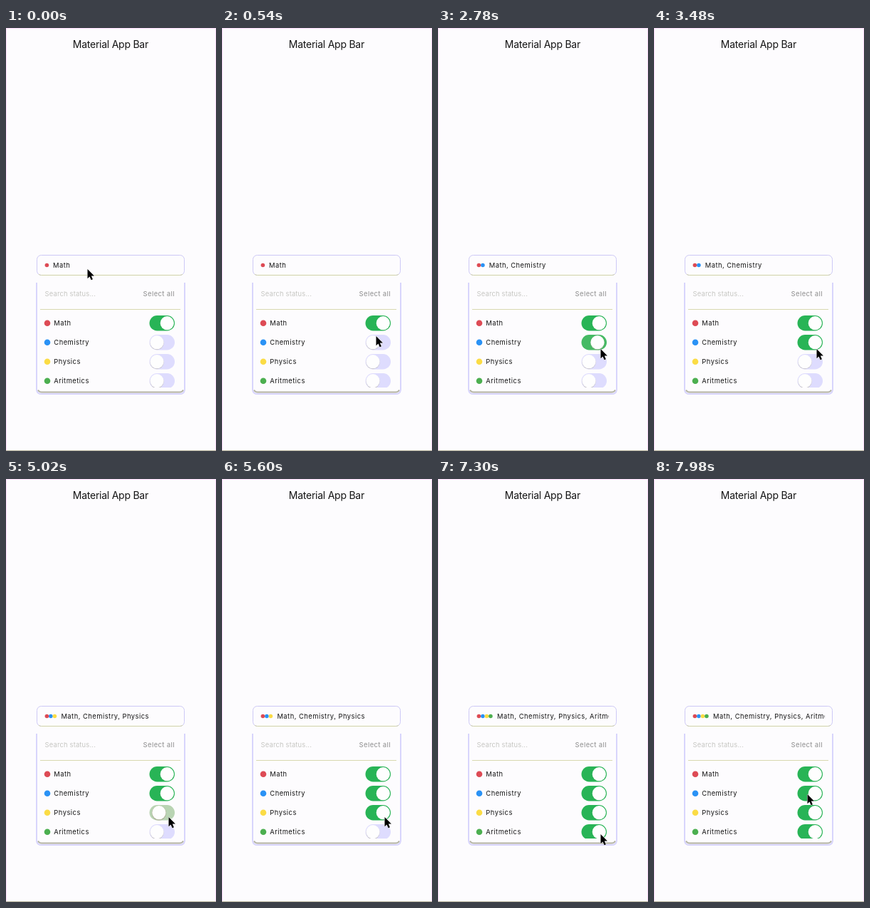
An HTML page that plays this animation: 295 px wide and 593 px high, repeating every 8000 ms.

```html
<!DOCTYPE html>
<html lang="en">
<head>
<meta charset="utf-8">
<title>Multi-select dropdown</title>
<style>
  html, body { margin: 0; width: 100%; height: 100%; overflow: hidden; background: #fdfcfe; }
  svg { display: block; width: 295px; height: 593px; }
  text { font: 400 9.4px Inter, sans-serif; letter-spacing: .48px; fill: #151515; white-space: pre; }
  .title { font-size: 14px; letter-spacing: -.25px; }
  .hint { letter-spacing: .18px; fill: #c6c6c2; }
  .all { font-weight: 500; letter-spacing: .37px; fill: #9b9b9b; }
</style>
</head>
<body>
<svg viewBox="0 0 295 593">
  <defs>
    <clipPath id="fieldClip"><rect x="50" y="320" width="190" height="25"/></clipPath>
    <clipPath id="listClip"><rect x="44" y="396" width="207" height="108"/></clipPath>
  </defs>
  <rect width="295" height="593" fill="#fdfcfe"/>
  <path d="M.5 592V.5H294.5V592" fill="none" stroke="#fbdcfb"/>
  <path d="M0 592.5H295" stroke="#b5b09a"/>
  <text class="title" x="93.8" y="28">Material App Bar</text>

  <rect x="43.5" y="318.5" width="207" height="28" rx="6" fill="#fdfcfe" stroke="#cdc9f6"/>
  <path d="M46 345.2Q47.5 346.5 49.5 346.5H244.5Q246.5 346.5 248 345.2" fill="none" stroke="#d0d2a8"/>
  <g id="field" clip-path="url(#fieldClip)"></g>

  <path d="M43 357V506Q43 513 50 513H244Q251 513 251 506V357" fill="none" stroke="#d8d5fc" stroke-width="2"/>
  <path d="M44 353V504Q44 511 50 511H244Q250 511 250 504V353Z" fill="#fdfcfe"/>
  <path d="M45 507.5Q46.5 510.5 50 510.5H244Q247.5 510.5 249 507.5" fill="none" stroke="#b3b3a4" stroke-width="1.8"/>
  <text class="hint" x="54.5" y="376">Search status...</text>
  <text class="all" x="192.6" y="376">Select all</text>
  <path d="M48 394.5H245" stroke="#d8d9b0"/>
  <g id="list" clip-path="url(#listClip)"></g>

  <path id="cursor" d="M.5 1V14.2L3.5 11.4 5.6 16.2 7.9 15.2 5.8 10.6H9.9Z"
        fill="#000" stroke="#fff" stroke-width="1" paint-order="stroke" stroke-linejoin="round"/>
</svg>
<script>
const LOOP = 8000, SLIDE = 350;

// on: moment the switch is pressed
const items = [
  { name: 'Math', color: '#dd4b55', on: -SLIDE },
  { name: 'Chemistry', color: '#2a92f5', on: 2520 },
  { name: 'Physics', color: '#fbdc45', on: 4920 },
  { name: 'Aritmetics', color: '#4caf50', on: 6560 }
];

// time, x, y of the pointer tip
const path = [
  [20, 114, 337], [540, 216, 431], [820, 220, 438], [960, 222, 440],
  [1380, 222, 440], [1560, 230, 446], [1940, 230, 446], [2100, 228, 449],
  [3560, 228, 449], [4080, 228, 469], [4180, 228, 469], [4360, 228, 473],
  [5740, 228, 473], [6460, 228, 497], [7400, 228, 497], [7960, 215, 441]
];

const $ = id => document.getElementById(id);
const clamp = v => Math.min(1, Math.max(0, v));
const ease = v => v * v * (3 - 2 * v);
const mix = (a, b, k) => a + (b - a) * k;

function set(el, attrs) {
  for (const key in attrs) el.setAttribute(key, attrs[key]);
}

function add(parent, tag, attrs, text) {
  const el = document.createElementNS('http://www.w3.org/2000/svg', tag);
  set(el, attrs);
  if (text) el.textContent = text;
  return parent.appendChild(el);
}

const label = add($('field'), 'text', { y: 335.7 });
items.forEach((item, i) => {
  const y = 413.7 + 27 * i, list = $('list');
  item.dot = add($('field'), 'circle', { cx: 57.4 + 5.5 * i, cy: 332.5, r: 2.8, fill: item.color });
  add(list, 'circle', { cx: 58, cy: y, r: 4.3, fill: item.color });
  add(list, 'text', { x: 67.3, y: y + 3.4 }, item.name);
  item.track = add(list, 'rect', { x: 201.5, y: y - 10.7, width: 35.5, height: 21.4, rx: 10.7 });
  item.shade = add(list, 'circle', { cy: y + .8, fill: '#a8a48c' });
  item.thumb = add(list, 'circle', { cy: y, r: 9.6, fill: '#fefefe' });
});

function pointerAt(t) {
  const next = path.findIndex(p => p[0] > t);
  if (next === 0) return path[0].slice(1);
  if (next < 0) return path[path.length - 1].slice(1);
  const a = path[next - 1], b = path[next];
  const k = ease((t - a[0]) / (b[0] - a[0]));
  return [mix(a[1], b[1], k), mix(a[2], b[2], k)];
}

// Lavender to green; blue fades first
function trackColor(k) {
  return `rgb(${mix(222, 40, k)}, ${mix(220, 180, k)}, ${mix(254, 86, Math.sqrt(k))})`;
}

function draw(t) {
  const chosen = items.filter(item => t >= item.on);
  const names = chosen.map(item => item.name).join(', ');
  if (label.textContent !== names) label.textContent = names;
  set(label, { x: 66 + 5.7 * (chosen.length - 1) });

  for (const item of items) {
    const k = ease(clamp((t - item.on) / SLIDE));
    const cx = mix(212, 226.3, k);
    const moving = 4 * k * (1 - k);
    set(item.dot, { visibility: t >= item.on ? 'visible' : 'hidden' });
    set(item.track, { fill: trackColor(k) });
    set(item.thumb, { cx });
    set(item.shade, { cx, r: 9.7 + .8 * moving, opacity: mix(.5, .1, k) + .4 * moving });
  }
  set($('cursor'), { transform: `translate(${pointerAt(t)})` });
}

const start = performance.now();
function tick() {
  draw((performance.now() - start) % LOOP);
  requestAnimationFrame(tick);
}
tick();
</script>
</body>
</html>
```
